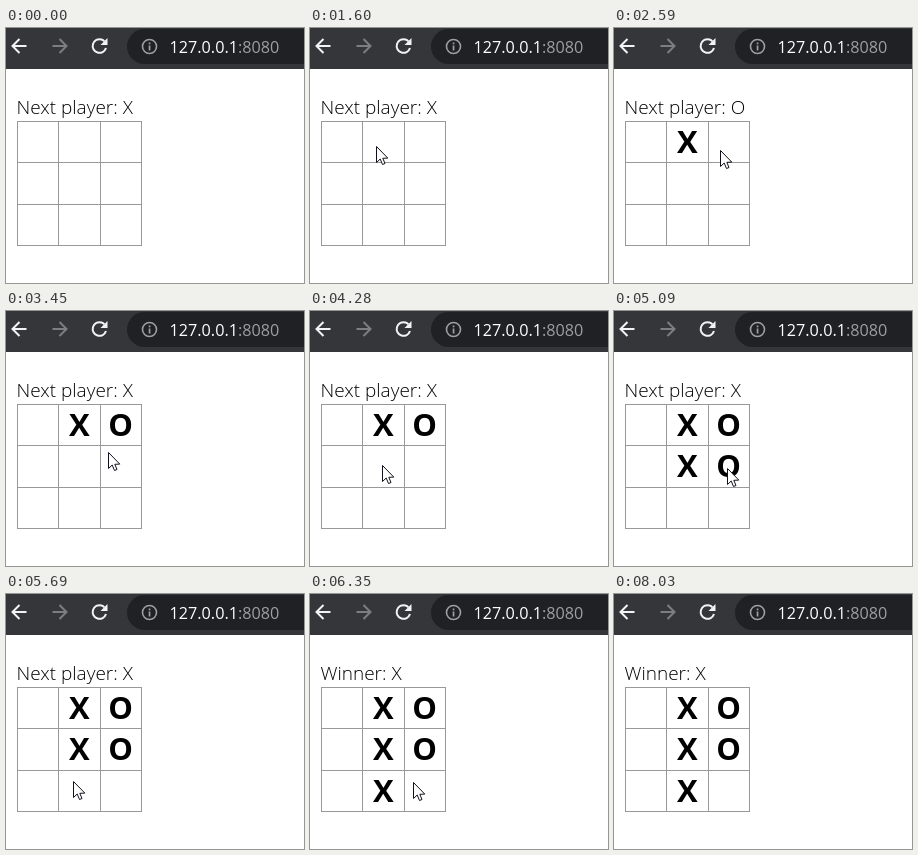
Recreate the animation shown at these times as an HTML page with a canvas. Size 298 by 255 pixels, loop 8760 ms.

```html
<!DOCTYPE html>
<html lang="en">
<head>
<meta charset="utf-8">
<title>Tic-tac-toe</title>
<style>
  html, body { margin: 0; width: 100%; height: 100%; overflow: hidden; background: #fff; }
  canvas { display: block; }
</style>
</head>
<body>
<canvas id="stage" width="298" height="255"></canvas>
<script>
const ctx = document.getElementById('stage').getContext('2d');
const LOOP = 8760;
const STEP = 66; // the pointer is redrawn at this interval while it moves
const CELL = 41.3;
const SANS = '"Open Sans", "Noto Sans", sans-serif';

const linear = p => p;
const accelerate = p => p * p;

const pointer = { enter: 390, leave: 8030, x: 252, y: 248 };
const glides = [
  { at: 390, steps: 3, x: 66, y: 118 },
  { at: 2450, steps: 3, x: 106, y: 122 },
  { at: 3340, steps: 2, x: 102, y: 141 },
  { at: 3540, steps: 2, x: 106, y: 152 },
  { at: 4210, steps: 2, x: 72, y: 154 },
  { at: 4610, steps: 3, x: 95, y: 154 },
  { at: 4810, steps: 1, x: 113, y: 157 },
  { at: 5290, steps: 2, x: 100, y: 170 },
  { at: 5490, steps: 4, x: 67, y: 187 },
  { at: 6085, steps: 5, x: 103, y: 188 },
  { at: 7630, steps: 6, x: 224, y: 246, ease: accelerate }
];

// X takes the middle column while O follows on the right.
const clickTimes = [2060, 2990, 4480, 4950, 5890];
const moves = clickTimes.map((at, i) => ({
  at, mark: 'XO'[i % 2], col: 1 + i % 2, row: Math.floor(i / 2)
}));

function text(value, x, y, font, color, align = 'left') {
  ctx.font = font;
  ctx.fillStyle = color;
  ctx.textAlign = align;
  ctx.fillText(value, x, y);
  return ctx.measureText(value).width;
}

function line(points, color, width = 2) {
  ctx.beginPath();
  points.forEach(([x, y]) => ctx.lineTo(x, y));
  ctx.strokeStyle = color;
  ctx.lineWidth = width;
  ctx.stroke();
}

function ring(x, y, radius, color, width, from = 0, to = Math.PI * 2) {
  ctx.beginPath();
  ctx.arc(x, y, radius, from, to);
  ctx.strokeStyle = color;
  ctx.lineWidth = width;
  ctx.stroke();
}

function arrow(cx, cy, dir, color) {
  line([[cx - 7 * dir, cy], [cx + 7 * dir, cy]], color);
  line([[cx, cy - 7], [cx + 7 * dir, cy], [cx, cy + 7]], color);
}

function drawReload(cx, cy, color) {
  ring(cx, cy, 6.8, color, 2, 0.3, 5.5);
  ctx.beginPath();
  ctx.moveTo(cx + 8, cy - 8);
  ctx.lineTo(cx + 8, cy - 1);
  ctx.lineTo(cx + 1, cy - 1);
  ctx.fillStyle = color;
  ctx.fill();
}

function drawToolbar() {
  const white = '#f1f3f4', grey = '#9aa0a6';
  ctx.fillStyle = '#35363a';
  ctx.fillRect(0, 0, 298, 41);
  ctx.fillStyle = '#202124';
  ctx.beginPath();
  ctx.roundRect(121, 1, 220, 35, 17.5);
  ctx.fill();

  arrow(13.5, 18, -1, white);
  arrow(53.5, 18, 1, '#7d7e81');
  drawReload(93.5, 18, white);

  ring(143.5, 18.5, 7, grey, 1.6);
  ctx.fillStyle = grey;
  ctx.fillRect(142.7, 17.5, 1.7, 5);
  ctx.fillRect(142.7, 14.5, 1.7, 1.8);

  const font = '16.2px ' + SANS;
  const width = text('127.0.0.1', 163.5, 24.5, '500 ' + font, '#fff');
  text(':8080', 163.5 + width, 24.5, font, grey);
}

function drawBoard(played) {
  const status = played.length === moves.length
    ? 'Winner: ' + played.at(-1).mark
    : 'Next player: ' + 'XO'[played.length % 2];
  text(status, 10.5, 86, '300 19px ' + SANS, '#000');

  ctx.fillStyle = '#999';
  for (let i = 0; i < 4; i++) {
    const offset = Math.round(i * CELL);
    ctx.fillRect(11 + offset, 93, 1, 125);
    ctx.fillRect(11, 93 + offset, 125, 1);
  }

  for (const { mark, col, row } of played) {
    text(mark, 32 + col * CELL, 125 + row * CELL, 'bold 31px ' + SANS, '#000', 'center');
  }
}

function pointerAt(time) {
  let { x, y } = pointer;
  for (const { at, steps, x: toX, y: toY, ease = linear } of glides) {
    if (time < at) break;
    const done = Math.min(steps, Math.floor((time - at) / STEP) + 1);
    const progress = ease(done / steps);
    x += (toX - x) * progress;
    y += (toY - y) * progress;
  }
  return [Math.round(x), Math.round(y)];
}

function drawPointer(x, y) {
  ctx.save();
  ctx.translate(x, y);
  ctx.beginPath();
  [[0.5, 0.5], [0.5, 16.5], [4.2, 13], [6.5, 18.5], [9, 17.5], [6.8, 12.3], [11.8, 12.1]]
    .forEach(([px, py]) => ctx.lineTo(px, py));
  ctx.closePath();
  ctx.fillStyle = '#fff';
  ctx.fill();
  ctx.strokeStyle = '#10101c';
  ctx.lineWidth = 1;
  ctx.stroke();
  ctx.restore();
}

function render(time) {
  ctx.fillStyle = '#fff';
  ctx.fillRect(0, 0, 298, 255);
  drawToolbar();
  drawBoard(moves.filter(move => move.at <= time));
  if (time >= pointer.enter && time < pointer.leave) drawPointer(...pointerAt(time));
}

const start = performance.now();
function tick() {
  render((performance.now() - start) % LOOP);
  requestAnimationFrame(tick);
}
tick();
</script>
</body>
</html>
```
